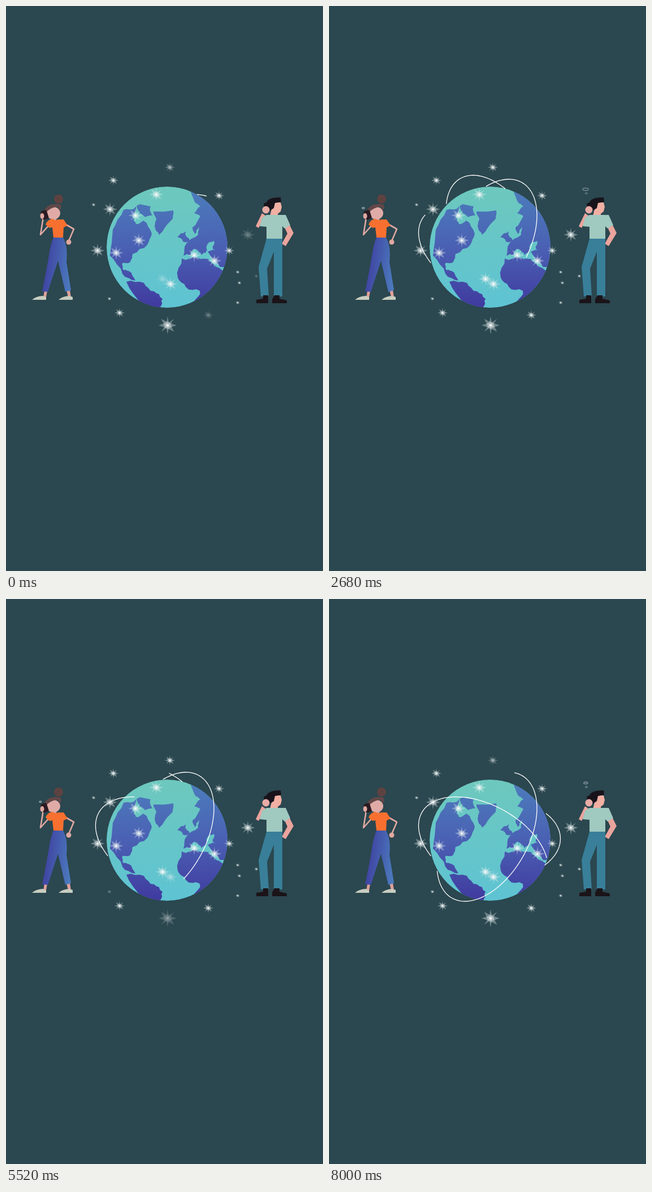
Recreate the animation shown at these times as an HTML page. Size 561 px wide and 998 px high, loop 8040 ms.

```html
<!DOCTYPE html>
<html lang="en">
<head>
<meta charset="utf-8">
<title>Calling around the globe</title>
<style>
  html, body { margin: 0; width: 100%; height: 100%; overflow: hidden; background: #2b474f; }
  svg { display: block; width: 100%; height: 100%; }
  #orbits path { fill: none; stroke: #fff; stroke-width: 1.3; }
  #ripples ellipse { fill: none; stroke: #dfe9ee; stroke-width: .9; }
  .limb { fill: none; stroke: #dfa8a2; stroke-width: 2.6; stroke-linejoin: round; }
</style>
</head>
<body>
<svg viewBox="0 0 561 998">
  <defs>
    <linearGradient id="sea" x1="0" y1="0" x2="0" y2="1">
      <stop offset="0" stop-color="#6dc8bd"/><stop offset="1" stop-color="#5ec3d3"/>
    </linearGradient>
    <linearGradient id="soil" gradientUnits="userSpaceOnUse" x1="285" y1="325" x2="285" y2="530">
      <stop offset="0" stop-color="#4c7cbc"/><stop offset=".5" stop-color="#4a60b3"/><stop offset="1" stop-color="#403b9f"/>
    </linearGradient>
    <linearGradient id="jeans" x1="0" y1=".4" x2="1" y2=".6">
      <stop offset="0" stop-color="#3e3d9e"/><stop offset="1" stop-color="#4b79bd"/>
    </linearGradient>
    <radialGradient id="glow">
      <stop offset="0" stop-color="#fff" stop-opacity=".8"/><stop offset="1" stop-color="#fff" stop-opacity="0"/>
    </radialGradient>
    <clipPath id="ball"><circle cx="285" cy="426" r="107"/></clipPath>
    <g id="star">
      <g fill="#e4efee" fill-opacity=".36">
        <path id="ray" d="M0-1L.13-.3 1 0 .13.3 0 1-.13.3-1 0-.13-.3Z"/>
        <use href="#ray" transform="rotate(45)"/>
      </g>
      <circle r=".5" fill="url(#glow)" opacity=".6"/>
      <circle r=".13" fill="#fff"/>
    </g>
  </defs>

  <g clip-path="url(#ball)">
    <circle cx="285" cy="426" r="107" fill="url(#sea)"/>
    <g id="land" fill="url(#soil)"></g>
  </g>

  <g id="woman">
    <path class="limb" d="M66 373L61 404 77 386M106 386L120 394 111 415"/>
    <circle cx="111" cy="417" r="4.5" fill="#dfa8a2"/>
    <path d="M82 368h8l-1 12h-8Z" fill="#d39a98"/>
    <ellipse cx="84" cy="366" rx="12" ry="11" fill="#e0aba6"/>
    <path d="M67 362Q75 346 97 351Q99 358 95 361L92 355Q84 353 68 366Z" fill="#624748"/>
    <circle cx="93" cy="341" r="8" fill="#5e4241"/>
    <rect x="63" y="361" width="11" height="16" rx="3" transform="rotate(-18 68 369)" fill="#2b1b22"/>
    <ellipse cx="64" cy="371" rx="3.5" ry="5" fill="#dfa8a2"/>
    <path d="M70 386Q74 376 83 376Q87 380 92 377H102L109 388 102 391 101 409H84L82 391 77 392Z" fill="#f8702f"/>
    <path d="M68 503h5l-2 12h-5ZM107 502h6l2 12h-5Z" fill="#dfa09a"/>
    <path d="M84 409H101Q110 425 107 452L115 502 105 505 92 450 74 505 64 504Q73 460 76 440T84 409Z" fill="url(#jeans)"/>
    <path id="shoe" d="M46 519Q52 513 65 512L71 514V519Z" fill="#c8cdc0"/>
    <use href="#shoe" x="47"/>
  </g>

  <g id="man">
    <path d="M453 366L442 389 447 392 459 370ZM493 391L502 387 509 401 495 424 488 420 498 402Z" fill="#eaa49d"/>
    <path d="M473 347H486L488 355 486 363 481 367V371H467Z" fill="#f1b0a3"/>
    <path d="M456 349L461 347Q464 338 486 338L487 346 476 348 474 357 466 362 458 361Z" fill="#18131b"/>
    <circle cx="460" cy="360" r="6.5" fill="#e9aca6"/>
    <path d="M461 369H495L503 387 493 393 489 389V412H461V390L449 389 453 374Z" fill="#a0c9c0"/>
    <path d="M461 411H489V513H474V434L462 464 465 513H451L447 461Z" fill="#397f99"/>
    <path d="M455 511H464V525H443V519L455 517ZM475 511H484V517L497 520V525H471V518Z" fill="#1b1419"/>
  </g>

  <g id="ripples"></g>
  <g id="stars"></g>
  <g id="orbits"></g>
</svg>

<script>
const LOOP = 8040, FRAME = 40;

const set = (el, attrs) => { for (const k in attrs) el.setAttribute(k, attrs[k]); };
const add = (parent, tag, attrs = {}) => {
  const el = document.createElementNS('http://www.w3.org/2000/svg', tag);
  set(el, attrs);
  return document.getElementById(parent).appendChild(el);
};

let seed = 7;
const random = () => (seed = seed * 16807 % 2147483647) / 2147483647;

// Roughens an outline by pushing the middle of every edge sideways
function roughen(points) {
  return points.flatMap(([x, y], i) => {
    const [u, v] = points[(i + 1) % points.length];
    const k = (random() - .5) * Math.min(.4, 5 / Math.hypot(u - x, v - y));
    return [[x, y], [(x + u) / 2 + (v - y) * k, (y + v) / 2 - (u - x) * k]];
  });
}
const coasts = {
  northAmerica: '208,360 230,354 224,372 230,385 243,379 258,402 250,422 224,438 220,452 206,454 207,466 217,468 229,485 206,473 184,441 189,395',
  arctic: '231,353 256,354 259,370 246,373 237,366',
  greenland: '261,363 296,361 291,380 271,404 263,388 266,376',
  iceland: '303,408 318,398 325,416 313,416',
  southAmerica: '213,487 244,489 262,504 277,517 272,533 240,527',
  africa: '311,446 338,444 362,452 383,467 394,460 386,494 340,526 333,521 343,503 318,496 304,480',
  arabia: '357,434 392,430 388,458 379,461',
  eurasia: '320,322 334,346 344,354 333,366 344,371 330,391 334,403 342,390 340,404 319,420 314,441 327,440 334,429 346,440 353,436 360,417 368,415 366,429 396,430 390,370 350,326'
};
for (const text of Object.values(coasts)) {
  const points = text.split(' ').map(p => p.split(',').map(Number));
  add('land', 'path', { d: 'M' + roughen(roughen(points)).join('L') + 'Z' });
}

// Tilted ellipse arcs: w, h are half sizes, lean is the tilt, from/to are angles
const orbits = [
  { x: 273, y: 437, w: 114.5, h: 87.5, lean: .42, from: .19, to: -3.77, first: 920, every: 3000 },
  { x: 279.5, y: 420, w: 88.5, h: 114, lean: -.44, from: 3.04, to: -1.59, first: 1160, every: 2980 },
  { x: 278.5, y: 420.5, w: 113.5, h: 88, lean: -.45, from: -1.02, to: 3.61, first: -40, every: 3015 },
  { x: 284.5, y: 423.5, w: 125, h: 74, lean: 0, from: 3.77, to: -.65, first: 360, every: 2950 },
  { x: 296, y: 413, w: 89, h: 114, lean: .46, from: -1.39, to: -6.28, first: 2380, every: 3080 }
];
function arc({ x, y, w, h, lean, from, to }) {
  const steps = 90, shift = Math.acos(lean);
  return 'M' + Array.from({ length: steps + 1 }, (_, i) => {
    const a = from + (to - from) * i / steps;
    return [x + w * Math.cos(a), y + h * Math.cos(a - shift)].map(n => n.toFixed(2));
  }).join('L');
}
for (const o of orbits) o.el = add('orbits', 'path', { d: arc(o), pathLength: 1 });

// One second to draw the line, one to wipe it
function drawOrbit({ el, first, every }, t) {
  const p = t < first ? 2 : (t - first) % every / 1000;
  el.style.display = p > 0 && p < 2 ? '' : 'none';
  const head = Math.min(p, 1), tail = Math.max(p - 1, 0);
  set(el, { 'stroke-dasharray': `${head - tail} 3`, 'stroke-dashoffset': -tail });
}

// Stars by radius: x, y and, for those that blink, when
const sky = {
  16: [[286, 564, 5400]],
  12.5: [[184, 359], [162, 432], [428, 404, 0], [266, 333], [229, 370], [235, 414], [195, 436],
    [333, 440, 1900], [369, 450], [277, 482, 0], [291, 491, 5400]],
  9: [[190, 308], [377, 335], [395, 432], [358, 546, 0], [290, 285, -300], [201, 542]],
  4: [[155, 351], [410, 470], [410, 524], [183, 517, 5400], [413, 489, 4100], [443, 477, 0]]
};
const stars = Object.entries(sky).flatMap(([r, spots]) => spots.map(([x, y, blink]) => ({
  blink, el: add('stars', 'use', { href: '#star', transform: `translate(${x} ${y}) scale(${r})` })
})));
function drawStar({ el, blink }, t) {
  const since = (t - blink + LOOP) % LOOP;
  set(el, { opacity: Math.min(1, .35 + since / 900) });
}

// Rings that rise from each phone and widen
const callers = [
  { x: 61, y: 360, drift: -2, first: 1060, every: 1455, width: u => 1.5 + 5 * u },
  { x: 457, y: 341, drift: -3, first: 1770, every: 1345, width: u => 1 + 2 * u + 4 * u ** 12 }
];
for (const c of callers) c.rings = [0, .4].map(() => add('ripples', 'ellipse'));
function drawRipples({ x, y, drift, first, every, width, rings }, t) {
  const p = t < first ? 2 : (t - first) % every / 950;
  rings.forEach((el, i) => {
    const u = p - i * .4, on = p < 1.03 && u >= 0;
    el.style.display = on ? '' : 'none';
    if (!on) return;
    const rx = width(u);
    set(el, { cx: x + drift * u, cy: y - 18 * u, rx, ry: .6 + rx * .3, opacity: (i ? .6 : 1) * (1 - .5 * p ** 12) });
  });
}

const begin = performance.now();
function tick() {
  const t = Math.floor((performance.now() - begin) % LOOP / FRAME) * FRAME;
  orbits.forEach(o => drawOrbit(o, t));
  callers.forEach(c => drawRipples(c, t));
  stars.filter(s => s.blink !== undefined).forEach(s => drawStar(s, t));
  requestAnimationFrame(tick);
}
tick();
</script>
</body>
</html>
```
